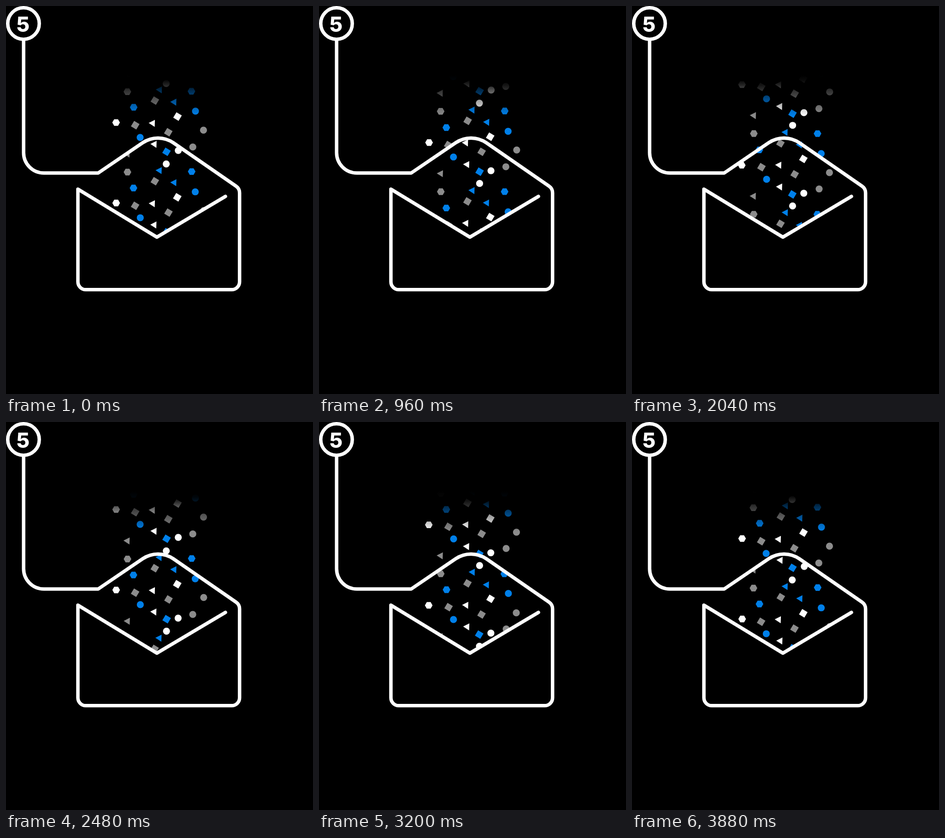
Animation of 666x841 px, one loop 3920 ms. Source, as an HTML page with a canvas:

```html
<!DOCTYPE html>
<html lang="en">
<head>
<meta charset="utf-8">
<title>Envelope</title>
<style>
  html, body { margin: 0; width: 100%; height: 100%; overflow: hidden; background: #000; }
  canvas { display: block; }
</style>
</head>
<body>
<canvas id="stage" width="666" height="841"></canvas>
<script>
const ctx = document.getElementById('stage').getContext('2d');
const TAU = Math.PI * 2;
const LOOP = 3920, STEP = 40, FALL_TIME = 3880, FALL_DISTANCE = 174.5;
const WHITE = '#fff', GRAY = '#8c8c8c', BLUE = '#0080ea';

// shape, colour, x and y at the start of the loop
const pieces = [
  ['hexagon', WHITE, 238.5, 253],
  ['hexagon', GRAY, 263.8, 185.3],
  ['hexagon', BLUE, 276.6, 219.8],
  ['hexagon', BLUE, 402.4, 184.8],
  ['square', GRAY, 280.6, 258],
  ['square', GRAY, 322.5, 205.5],
  ['square', GRAY, 352.5, 273.3],
  ['square', WHITE, 371.9, 239.7],
  ['square', BLUE, 348, 316.3],
  ['triangle', WHITE, 317, 253.8],
  ['triangle', WHITE, 319.8, 300.2],
  ['triangle', GRAY, 262, 320.8],
  ['triangle', BLUE, 331.5, 356.5],
  ['triangle', BLUE, 362.8, 208.9],
  ['circle', BLUE, 291.5, 284.4],
  ['circle', BLUE, 410.7, 228],
  ['circle', GRAY, 428.4, 269.3],
  ['circle', GRAY, 405.6, 305.2],
  ['circle', WHITE, 373.2, 313.6],
  ['circle', WHITE, 348, 342]
];

function polygon(x, y, sides, radius, turn) {
  for (let i = 0; i < sides; i++) {
    const a = turn + i * TAU / sides;
    ctx.lineTo(x + radius * Math.cos(a), y + radius * Math.sin(a));
  }
}

const shapes = {
  circle: (x, y) => ctx.arc(x, y, 7.6, 0, TAU),
  hexagon: (x, y) => polygon(x, y, 6, 8.3, 0),
  square: (x, y) => polygon(x, y, 4, 9.6, TAU * 76 / 360),
  triangle(x, y) {
    ctx.moveTo(x - 7, y - 0.8);
    ctx.lineTo(x + 6.5, y - 7.6);
    ctx.lineTo(x + 6, y + 7.6);
  }
};

// gentle drift around the straight fall
function wobble(seconds, seed) {
  return 0.5 * Math.sin(seconds * 4.6 + seed * 2.4);
}

function drawPieces(time) {
  pieces.forEach(([shape, color, x, y], i) => {
    ctx.fillStyle = color;
    for (let cycle = -2; cycle <= 1; cycle++) {
      const age = time / FALL_TIME + cycle;
      const top = y + age * FALL_DISTANCE;
      if (top < 135 || top > 515) continue;
      const seconds = age * FALL_TIME / 1000;
      ctx.beginPath();
      shapes[shape](x + wobble(seconds, i + 1), top + wobble(seconds, i + 31));
      ctx.fill();
    }
  });
}

const fade = ctx.createLinearGradient(0, 150, 0, 238);
[[150, 0], [162, 0.04], [172, 0.15], [184, 0.35], [204, 0.62], [238, 1]].forEach(([y, shown]) =>
  fade.addColorStop((y - 150) / 88, `rgba(0,0,0,${1 - shown})`));

function drawFade() {
  ctx.fillStyle = fade;
  ctx.fillRect(210, 120, 250, 118);
}

function drawPocket() {
  ctx.fillStyle = '#000';
  ctx.beginPath();
  ctx.moveTo(156, 397);
  ctx.lineTo(327, 501);
  ctx.lineTo(476, 412.5);
  ctx.lineTo(500, 610);
  ctx.lineTo(160, 610);
  ctx.fill();
}

function drawOutline() {
  ctx.strokeStyle = WHITE;
  ctx.lineCap = ctx.lineJoin = 'round';
  ctx.lineWidth = 7.5;
  ctx.beginPath();
  ctx.moveTo(38.2, 73);
  ctx.arcTo(38.2, 362, 200, 362, 44);
  ctx.lineTo(200, 362);
  ctx.arcTo(330, 273.6, 506.7, 395.7, 59);
  ctx.arcTo(506.7, 395.7, 506.7, 614.8, 18);
  ctx.arcTo(506.7, 614.8, 156, 614.8, 17);
  ctx.arcTo(156, 614.8, 156, 397, 17);
  ctx.lineTo(156, 397);
  ctx.lineTo(327.3, 501);
  ctx.lineTo(476, 412.7);
  ctx.stroke();

  ctx.beginPath();
  ctx.arc(38, 38, 34.2, 0, TAU);
  ctx.stroke();

  ctx.fillStyle = WHITE;
  ctx.font = '800 45px Inter, sans-serif';
  ctx.textAlign = 'center';
  ctx.fillText('5', 37, 56.4);
}

function render(time) {
  ctx.fillStyle = '#000';
  ctx.fillRect(0, 0, 666, 841);
  drawPieces(time);
  drawFade();
  drawPocket();
  drawOutline();
}

const start = performance.now();
function tick() {
  const elapsed = (performance.now() - start) % LOOP;
  render(Math.floor(elapsed / STEP) * STEP);
  requestAnimationFrame(tick);
}
tick();
</script>
</body>
</html>
```
